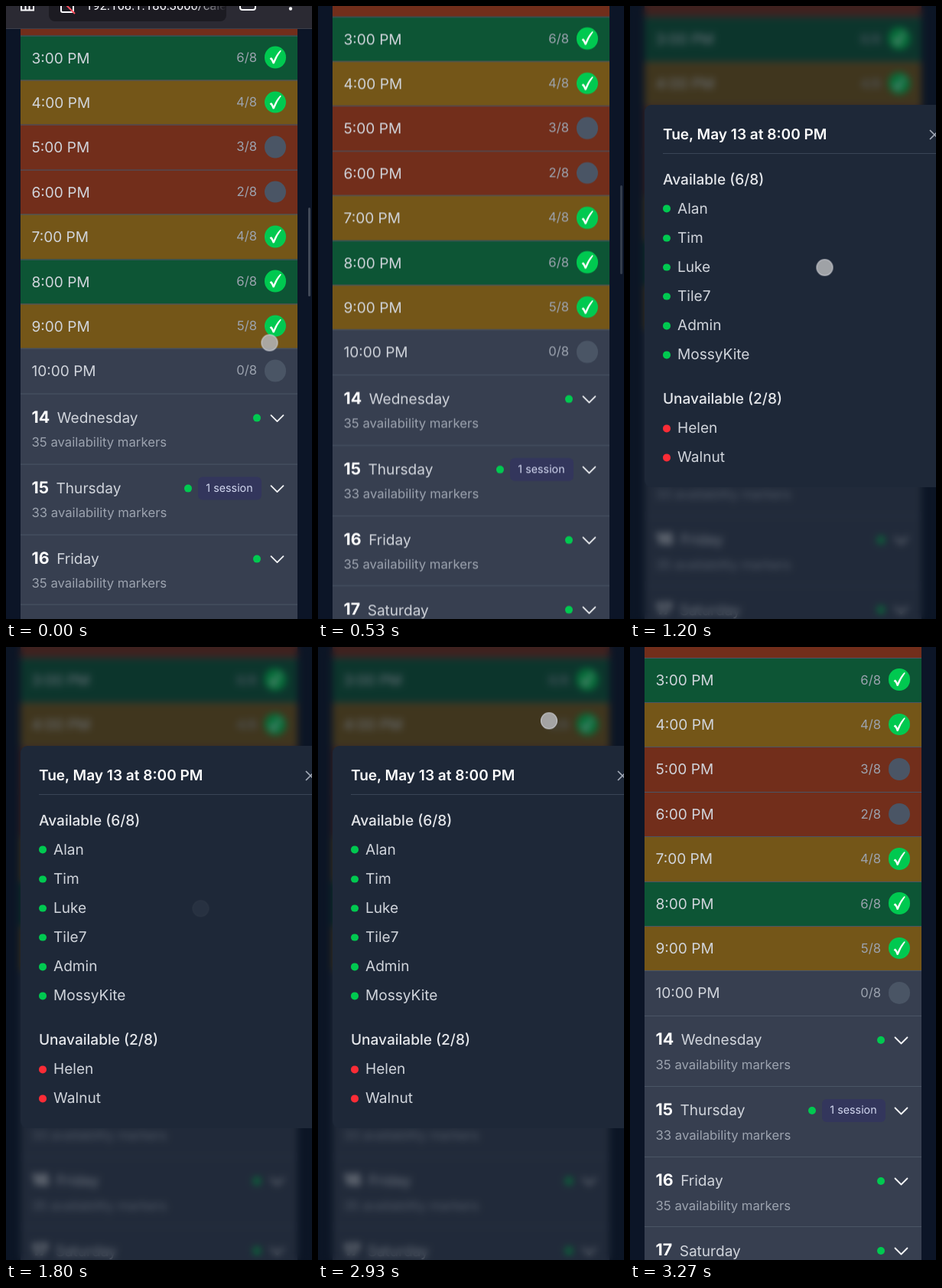
An HTML page for the animation above (3340 ms loop, 400 px wide and 800 px high).

```html
<!DOCTYPE html>
<html lang="en">
<head>
<meta charset="utf-8">
<title>Availability calendar</title>
<style>
  :root { --line: #4a5565; --green: #00c950; --loop: 3340ms step-end infinite; }
  * { box-sizing: border-box; }
  html, body { margin: 0; width: 100%; height: 100%; overflow: hidden; background: #0c1527; }
  #stage {
    position: relative; width: 400px; height: 800px; overflow: hidden;
    background: #0c1527; color: #d1d5dc; font: 19.07px/1 Inter, sans-serif; white-space: nowrap;
    font-optical-sizing: none; text-rendering: geometricPrecision;
  }
  #stage div, #stage svg, .at { position: absolute; }
  .mid { transform: translateY(-50%); }

  /* calendar list */
  #list { left: 19px; top: -44.8px; width: 362px; background: #373f50; animation: settle var(--loop); }
  #list .slot, #list .day { position: relative; border-top: 1px solid var(--line); }
  #list .slot { height: 58.4px; }
  #list .day { height: 91.9px; }
  .high { background: #0d5535; }
  .some { background: #745618; }
  .low { background: #722e1b; }
  .slot .mid { top: 29px; }
  .slot .time { left: 14.5px; }
  .count { right: 53px; font-size: 16.7px; color: #9ca3af; }
  #stage .mark { left: 318.7px; top: 13.9px; width: 28.6px; height: 28.6px; border-radius: 50%; background: #4a5565; }
  #stage .mark.yes { background: var(--green); }
  .name { left: 14.5px; top: 31px; display: flex; gap: 9.5px; align-items: center; }
  .name b { font-size: 21.4px; color: #fff; }
  .note { left: 14.5px; top: 64.5px; font-size: 16.7px; color: #9ca3af; }
  .pip { width: 10px; height: 10px; border-radius: 50%; background: var(--green); }
  .day .pip { left: 304px; top: 26px; }
  .day.busy .pip { left: 213.5px; }
  .pill {
    left: 231.5px; top: 16px; width: 83px; height: 30px; border-radius: 6px; background: #33365c;
    font-size: 14.3px; line-height: 30px; text-align: center; color: #d3d8f0;
  }
  .arrow { left: 326px; top: 26px; }

  /* browser chrome */
  #bar {
    left: 0; top: 0; width: 400px; height: 29.5px; overflow: hidden;
    background: #2b2a33; border-bottom: 1.5px solid #3d3f4a; animation: hide var(--loop);
  }
  #url { left: 56px; top: -20px; width: 232px; height: 40px; border-radius: 8px; background: #1c1b22; overflow: hidden; }
  #url span {
    position: absolute; left: 48px; top: 12px; width: 184px; overflow: hidden; font: 16.5px/18px Roboto, sans-serif; color: #fbfbfe;
    -webkit-mask: linear-gradient(90deg, #000 75%, transparent); mask: linear-gradient(90deg, #000 75%, transparent);
  }
  #thumb { left: 394.5px; top: 234px; width: 3.5px; height: 116px; border-radius: 2px; background: #414957; animation: hideThumb var(--loop); }

  /* dialog */
  #veil {
    inset: 0; background: rgba(13, 22, 37, .5); visibility: hidden;
    -webkit-backdrop-filter: blur(5px); backdrop-filter: blur(5px); animation: open var(--loop);
  }
  #dialog { left: 19px; top: 129px; width: 420px; height: 499px; border-radius: 9px; background: #1e2838; }
  #dialog h2, #dialog h3 { position: absolute; margin: 0; left: 24px; font-size: 19.07px; }
  #dialog h2 { top: 39px; font-weight: 600; color: #fff; }
  #dialog h3 { font-weight: 500; color: #e5e7eb; }
  #dialog hr { position: absolute; margin: 0; border: 0; left: 24px; top: 62.5px; width: 380px; height: 1px; background: #3a4556; }
  .who { left: 43px; }
  .who::before {
    content: ""; position: absolute; left: -19px; top: 4.8px; width: 9.6px; height: 9.6px;
    border-radius: 50%; background: var(--green);
  }
  .who.away::before { background: #fb2c36; }

  #touch {
    left: -11px; top: -11px; width: 22px; height: 22px; border-radius: 50%;
    background: rgba(178, 179, 181, .88); border: 1px solid rgba(214, 216, 222, .7);
    animation: tap var(--loop);
  }

  @keyframes settle {
    0% { transform: translateY(24.6px); }
    2.05% { transform: translateY(11.5px); }
    3.85% { transform: translateY(3.3px); }
    5.95%, 100% { transform: none; }
  }
  @keyframes hide {
    0% { transform: none; }
    2.05% { transform: translateY(-15px); }
    3.85% { transform: translateY(-26.3px); }
    5.95%, 100% { transform: translateY(-30px); }
  }
  @keyframes hideThumb {
    0% { transform: translateY(29px); opacity: 1; }
    2.05% { transform: translateY(14px); opacity: 1; }
    3.85% { transform: translateY(3px); opacity: 1; }
    5.95% { transform: none; opacity: 1; }
    15.8% { transform: none; opacity: .75; }
    17.9% { transform: none; opacity: .5; }
    20% { transform: none; opacity: .25; }
    21.8%, 100% { transform: none; opacity: 0; }
  }
  @keyframes open {
    0% { visibility: hidden; }
    35.9% { visibility: visible; }
    91.9%, 100% { visibility: hidden; }
  }
  @keyframes tap {
    0% { transform: translate(344.5px, 439.5px); opacity: 1; }
    2.05% { transform: translate(344.5px, 439.5px); opacity: .8; }
    3.85% { transform: translate(344.5px, 439.5px); opacity: .57; }
    5.95% { transform: translate(344.5px, 439.5px); opacity: .3; }
    8.05% { transform: translate(344.5px, 439.5px); opacity: .1; }
    9.85% { transform: translate(254.5px, 341.3px); opacity: 0; }
    26% { transform: translate(254.5px, 341.3px); opacity: 1; }
    44% { transform: translate(254.5px, 341.3px); opacity: .95; }
    45.8% { transform: translate(254.5px, 341.3px); opacity: .85; }
    47.85% { transform: translate(254.5px, 341.3px); opacity: .68; }
    49.95% { transform: translate(254.5px, 341.3px); opacity: .48; }
    51.75% { transform: translate(254.5px, 341.3px); opacity: .27; }
    53.85% { transform: translate(254.5px, 341.3px); opacity: .08; }
    55.95% { transform: translate(302px, 96.3px); opacity: 0; }
    85.9% { transform: translate(302px, 96.3px); opacity: 1; }
    89.8% { transform: translate(302px, 96.3px); opacity: .8; }
    91.9% { transform: translate(302px, 96.3px); opacity: .6; }
    93.7% { transform: translate(302px, 96.3px); opacity: .38; }
    95.8% { transform: translate(302px, 96.3px); opacity: .15; }
    97.85%, 100% { transform: translate(302px, 96.3px); opacity: 0; }
  }
</style>
</head>
<body>
<div id="stage">
  <div id="list"></div>
  <div id="bar">
    <svg width="400" height="29" fill="none" stroke="#fbfbfe" stroke-width="2">
      <path d="M20 -8V5.500H36V-8M25.500 5V-3H30.500V5"/>
      <rect x="306" y="-13" width="20" height="18" rx="3"/>
      <circle cx="372" cy="3.500" r="1.200" fill="#fbfbfe"/>
    </svg>
    <div id="url">
      <svg width="48" height="40" fill="none" stroke="#fbfbfe" stroke-width="2">
        <rect x="16" y="12" width="16" height="16" rx="2"/>
        <path d="M13 9L34 30" stroke="#ff4f5e"/>
      </svg>
      <span>192.168.1.186:3000/cale</span>
    </div>
  </div>
  <div id="thumb"></div>
  <div id="veil">
    <div id="dialog">
      <h2 class="mid">Tue, May 13 at 8:00 PM</h2>
      <svg style="left:372px;top:32px" width="14" height="14" stroke="#a4abb8" stroke-width="1.700"><path d="M1 1L13 13M13 1L1 13"/></svg>
      <hr>
    </div>
  </div>
  <div id="touch"></div>
</div>
<script>
  const slots = [[2, 'low', 3], [3, 'high', 6, 1], [4, 'some', 4, 1], [5, 'low', 3], [6, 'low', 2],
    [7, 'some', 4, 1], [8, 'high', 6, 1], [9, 'some', 5, 1], [10, '', 0]];
  const days = [[14, 'Wednesday', 35], [15, 'Thursday', 33, 1], [16, 'Friday', 35], [17, 'Saturday', 35]];
  const check = `<svg width="28.6" height="28.6" viewBox="-15 -15 30 30"><path fill="#fff"
    d="M-8 2L-6 .2Q-4 1-2.700 4.800Q1-4 6.500-9.500L8-9Q2-1-1.700 8.800L-3.600 9Q-5 4-8 2Z"/></svg>`;
  const arrow = `<svg class="arrow" width="20" height="12" fill="none" stroke="#f3f4f6" stroke-width="1.800"
    stroke-linecap="round" stroke-linejoin="round"><path d="M1.500 1.500L9.500 9.500L17.500 1.500"/></svg>`;

  const slotRow = ([hour, level, count, joined]) => `<div class="slot ${level}">
    <span class="at mid time">${hour}:00 PM</span><span class="at mid count">${count}/8</span>
    <div class="mark ${joined ? 'yes' : ''}">${joined ? check : ''}</div></div>`;
  const dayRow = ([date, name, markers, busy]) => `<div class="day ${busy ? 'busy' : ''}">
    <div class="name mid"><b>${date}</b>${name}</div><div class="pip"></div>
    ${busy ? '<div class="pill">1 session</div>' : ''}${arrow}
    <div class="note mid">${markers} availability markers</div></div>`;
  document.getElementById('list').innerHTML = slots.map(slotRow).join('') + days.map(dayRow).join('');

  const group = (title, top, people, state) => `<h3 class="mid" style="top:${top}px">${title}</h3>` +
    people.map((person, i) =>
      `<div class="who mid ${state}" style="top:${top + 38.15 * (i + 1)}px">${person}</div>`).join('');
  document.getElementById('dialog').insertAdjacentHTML('beforeend',
    group('Available (6/8)', 97.5, ['Alan', 'Tim', 'Luke', 'Tile7', 'Admin', 'MossyKite'], '') +
    group('Unavailable (2/8)', 384, ['Helen', 'Walnut'], 'away'));
</script>
</body>
</html>
```
